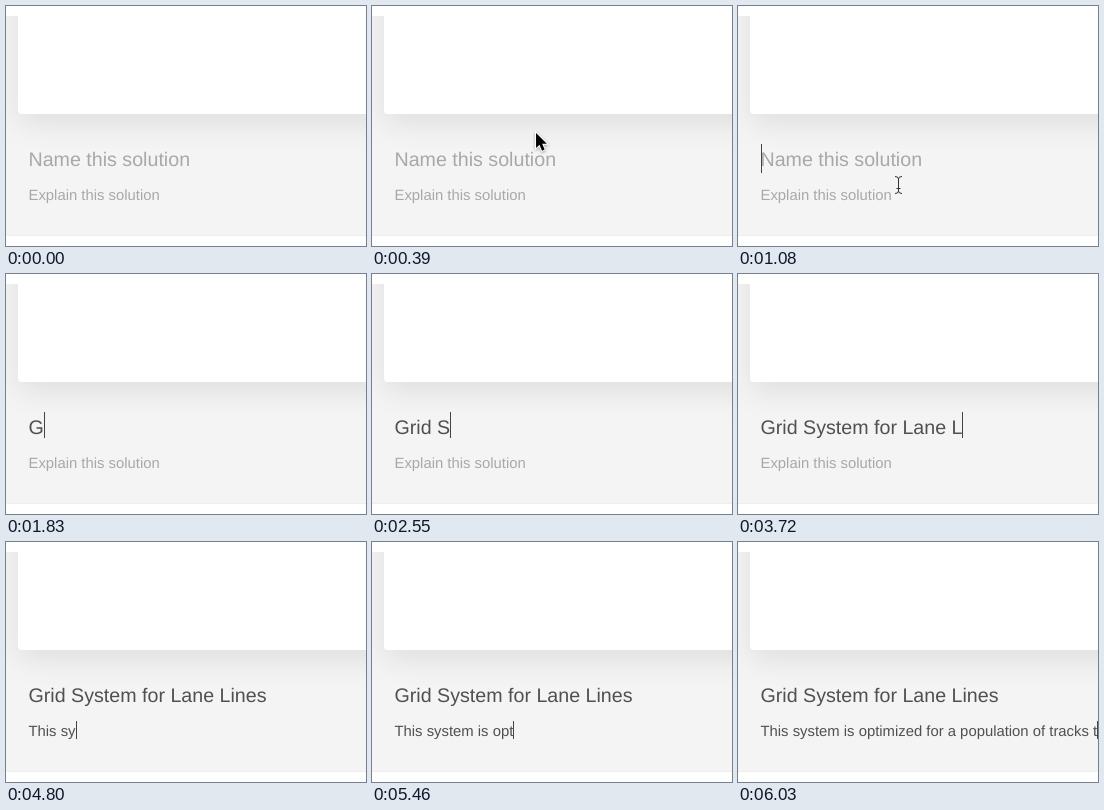
These frames come from a looping animation (360x240 px, 6.06 s). An HTML page with a canvas:

```html
<!DOCTYPE html>
<html lang="en">
<head>
<meta charset="utf-8">
<title>Naming a solution</title>
<style>
  html, body { margin: 0; width: 100%; height: 100%; overflow: hidden; background: #fff; }
  canvas { display: block; }
</style>
</head>
<body>
<canvas id="stage" width="360" height="240"></canvas>
<script>
const ctx = document.getElementById('stage').getContext('2d');
const LOOP = 6060, TICK = 30, LEFT = 22.5;

// Each run of keystrokes: [first key time, last key time, number of keys]
const title = {
  placeholder: 'Name this solution',
  text: 'Grid System for Lane Lines',
  size: 19.65, baseline: 160,
  focus: 930, blur: 4170,
  caretTop: 138, caretHeight: 26, emptyCaretHeight: 29,
  runs: [[1830, 1830, 1], [1980, 1980, 1], [2160, 2730, 6], [2820, 3060, 5],
         [3120, 3420, 5], [3450, 3570, 3], [3720, 3720, 1], [3840, 3990, 4]]
};
const description = {
  placeholder: 'Explain this solution',
  text: 'This system is optimized for a population of tracks t',
  size: 14.85, baseline: 194,
  focus: 4170, blur: LOOP,
  caretTop: 179, caretHeight: 18, emptyCaretHeight: 20,
  runs: [[4410, 4800, 7], [4890, 5010, 3], [5070, 5670, 12], [5700, 6030, 31]]
};

function typedCount(runs, t) {
  return runs.reduce((sum, [start, end, keys]) => {
    if (t < start) return sum;
    const progress = (t - start) / (end - start || 1);
    return sum + Math.min(keys, 1 + Math.floor(progress * (keys - 1)));
  }, 0);
}

function drawField(field, t) {
  const typed = field.text.slice(0, typedCount(field.runs, t));
  ctx.font = `${field.size}px "Liberation Sans", Arial, sans-serif`;
  ctx.textRendering = 'geometricPrecision';
  ctx.fillStyle = typed ? '#505050' : '#a8a8a8';
  ctx.fillText(typed || field.placeholder, LEFT, field.baseline);

  const focused = t >= field.focus && t < field.blur;
  const blinkOn = typed || Math.floor((t - field.focus) / 300) % 2 === 0;
  if (focused && blinkOn) {
    ctx.fillStyle = '#444';
    const x = Math.round(LEFT + ctx.measureText(typed).width);
    ctx.fillRect(x, field.caretTop, 1, typed ? field.caretHeight : field.emptyCaretHeight);
  }
}

function drawBackground() {
  ctx.fillStyle = '#f4f4f4';
  ctx.fillRect(0, 10, 360, 220);
  ctx.save();
  ctx.shadowColor = 'rgba(0, 0, 0, .085)';
  ctx.shadowBlur = 30;
  ctx.shadowOffsetY = 10;
  ctx.fillStyle = '#fff';
  ctx.beginPath();
  ctx.roundRect(12, -60, 450, 168, 4);
  ctx.fill();
  ctx.restore();
  ctx.fillStyle = '#eee';
  ctx.fillRect(0, 229, 360, 1);
}

function drawArrow(x, y) {
  ctx.save();
  ctx.translate(x, y);
  ctx.shadowColor = 'rgba(0, 0, 0, .35)';
  ctx.shadowBlur = 3;
  ctx.shadowOffsetY = 1;
  const shape = new Path2D('M0 0V15L3.4 11.8L6 17.6L8.6 16.4L6.1 10.8H10.8Z');
  ctx.strokeStyle = '#fff';
  ctx.lineWidth = 2;
  ctx.stroke(shape);
  ctx.shadowColor = 'transparent';
  ctx.fillStyle = '#000';
  ctx.fill(shape);
  ctx.restore();
}

function drawBeam(x, y) {
  ctx.save();
  ctx.translate(Math.round(x), Math.round(y));
  ctx.strokeStyle = '#333';
  ctx.lineWidth = 1;
  ctx.stroke(new Path2D('M-3 -8.5Q.5 -8.5 .5 -6V6Q.5 8.5 -3 8.5M4 -8.5Q.5 -8.5 .5 -6M4 8.5Q.5 8.5 .5 6M-1.5 3.5H2.5'));
  ctx.restore();
}

function drawPointer(t) {
  if (t < 60 || t >= 1230) return;
  const left = 1 - Math.min(1, (t - 60) / 570);
  const x = 160 + 198 * left ** 4.5;
  let y = 159 - 149 * left ** 1.78;
  if (t >= 1080) y += t < 1140 ? 20 : 47;
  if (y < 138) drawArrow(x, y);
  else drawBeam(x, y);
}

function frame(now) {
  const t = Math.floor(now % LOOP / TICK) * TICK;
  ctx.clearRect(0, 0, 360, 240);
  ctx.save();
  ctx.beginPath();
  ctx.rect(0, 10, 360, 220);
  ctx.clip();
  drawBackground();
  drawField(title, t);
  drawField(description, t);
  drawPointer(t);
  ctx.restore();
  requestAnimationFrame(() => frame(performance.now() - start));
}

const start = performance.now();
frame(0);
</script>
</body>
</html>
```
